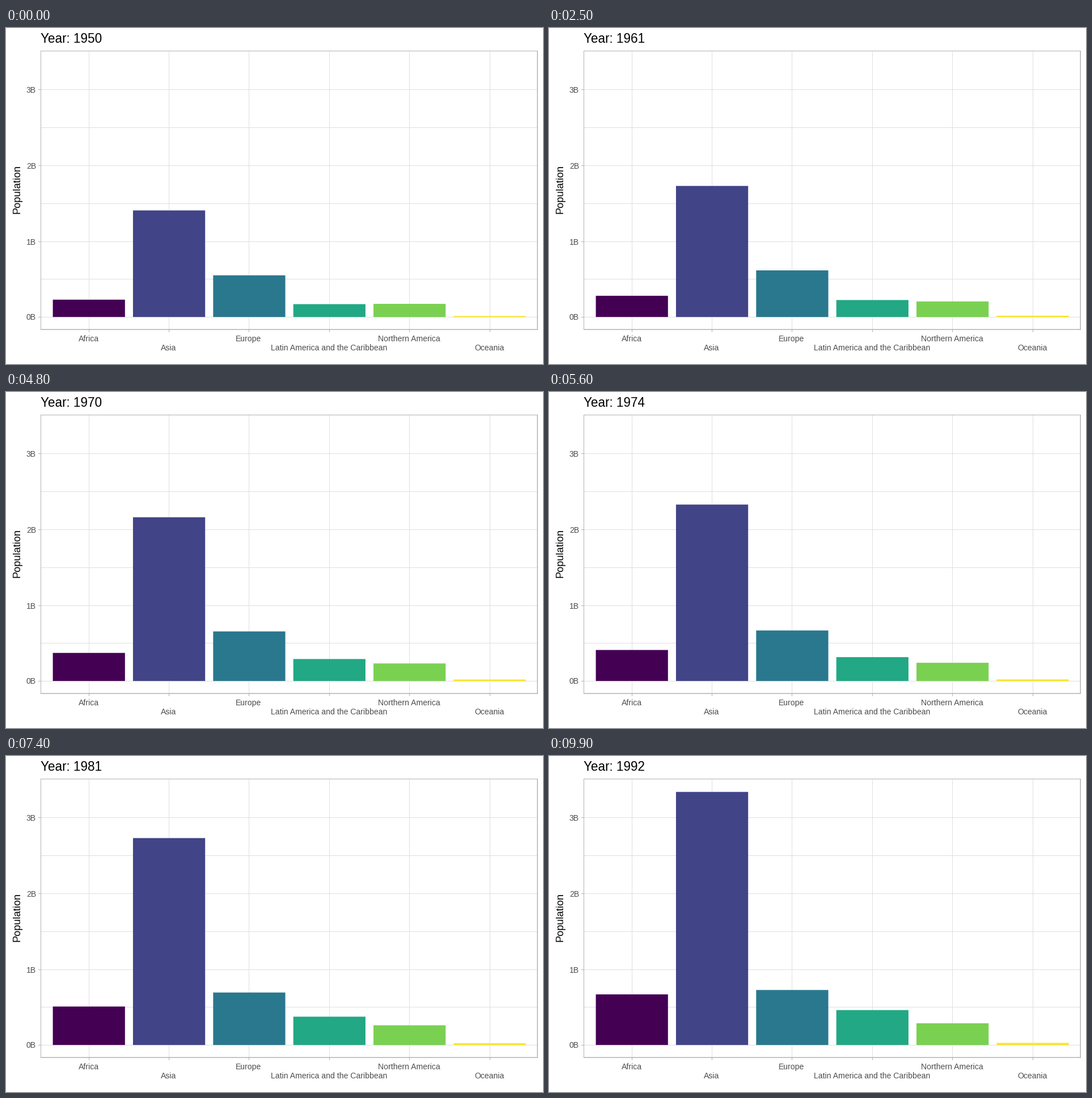
Write a matplotlib script that moves like this. It is 947 px wide and 592 px high and loops after 10 s.

```python
import numpy as np
import matplotlib.pyplot as plt
from matplotlib.animation import FuncAnimation
from matplotlib.patches import Rectangle

W, H, DPI = 947, 592, 64
FRAMES, INTERVAL = 100, 100
FIRST, LAST = 1950, 1992

LEFT, TOP, RIGHT, BOTTOM = 61, 41, 937, 531
ZERO, BILLION = 509.12, 133.6           # baseline and pixels per billion
START, PITCH = 146.21, 141.36           # first bar centre and spacing
BAR_W = 0.9 * PITCH

GRID, BORDER, INK = "#dfdfdf", "#b3b3b3", "#4d4d4d"

# Name, billions at the first and last year, bend of the growth curve
REGIONS = [
    ("Africa", 0.228, 0.667, 1.56),
    ("Asia", 1.405, 3.337, 1.3),
    ("Europe", 0.549, 0.725, 0.72),
    ("Latin America and the Caribbean", 0.169, 0.460, 1.22),
    ("Northern America", 0.173, 0.286, 0.92),
    ("Oceania", 0.013, 0.028, 1.12),
]
COLORS = plt.cm.viridis(np.linspace(0, 1, len(REGIONS)))

plt.rcParams["font.family"] = "Liberation Sans"
fig = plt.figure(figsize=(W / DPI, H / DPI), dpi=DPI, facecolor="white")
ax = fig.add_axes([0, 0, 1, 1])
ax.set_xlim(0, W)
ax.set_ylim(H, 0)
ax.axis("off")


def box(x, y, w, h, color, z):
    patch = Rectangle((x, y), w, h, facecolor=color, edgecolor="none",
                      linewidth=0, snap=False, zorder=z)
    return ax.add_patch(patch)


def label(x, y, text, px, color=INK, ha="center", **kw):
    return ax.text(x, y, text, fontsize=px * 72 / DPI, color=color,
                   ha=ha, va="baseline", **kw)


def population(start, end, bend, t):
    return start + (end - start) * t ** bend


# Horizontal grid with a labelled tick at every billion
for half in range(7):
    y = round(ZERO - half / 2 * BILLION)
    box(LEFT, y, RIGHT - LEFT, 1, GRID, 1)
    if half % 2 == 0:
        box(LEFT - 4, y, 4, 1, BORDER, 1)
        label(53, y + 5.5, f"{half // 2}B", 14, ha="right")

# Vertical grid, staggered names and the bars
bars = []
for i, (name, *_) in enumerate(REGIONS):
    center = START + i * PITCH
    x = int(center)
    box(x, TOP, 1, BOTTOM - TOP, GRID, 1)
    box(x, BOTTOM, 1, 5, BORDER, 1)
    label(x, 568.5 if i % 2 else 552, name, 14)
    bars.append(box(center - BAR_W / 2, ZERO, BAR_W, 0, COLORS[i], 2))

# Panel border
box(LEFT, TOP - 1, 1, BOTTOM - TOP + 2, BORDER, 3)
box(LEFT, TOP - 1, RIGHT - LEFT + 1, 1, BORDER, 3)
box(RIGHT - 0.5, TOP - 1, 1.5, BOTTOM - TOP + 2, BORDER, 3)
box(LEFT, BOTTOM - 0.5, RIGHT - LEFT + 1, 1.5, BORDER, 3)

label(24.5, 283.5, "Population", 18.3, "black", rotation=90, rotation_mode="anchor")
title = label(61, 26, "", 22.5, "black", ha="left")


def update(frame):
    t = frame / (FRAMES - 1)
    title.set_text(f"Year: {round(FIRST + (LAST - FIRST) * t)}")
    for bar, (_, start, end, bend) in zip(bars, REGIONS):
        bar.set_height(-BILLION * population(start, end, bend, t))
    return [title, *bars]


anim = FuncAnimation(fig, update, frames=FRAMES, interval=INTERVAL,
                     repeat=True, repeat_delay=0, blit=False)
plt.show()
```
